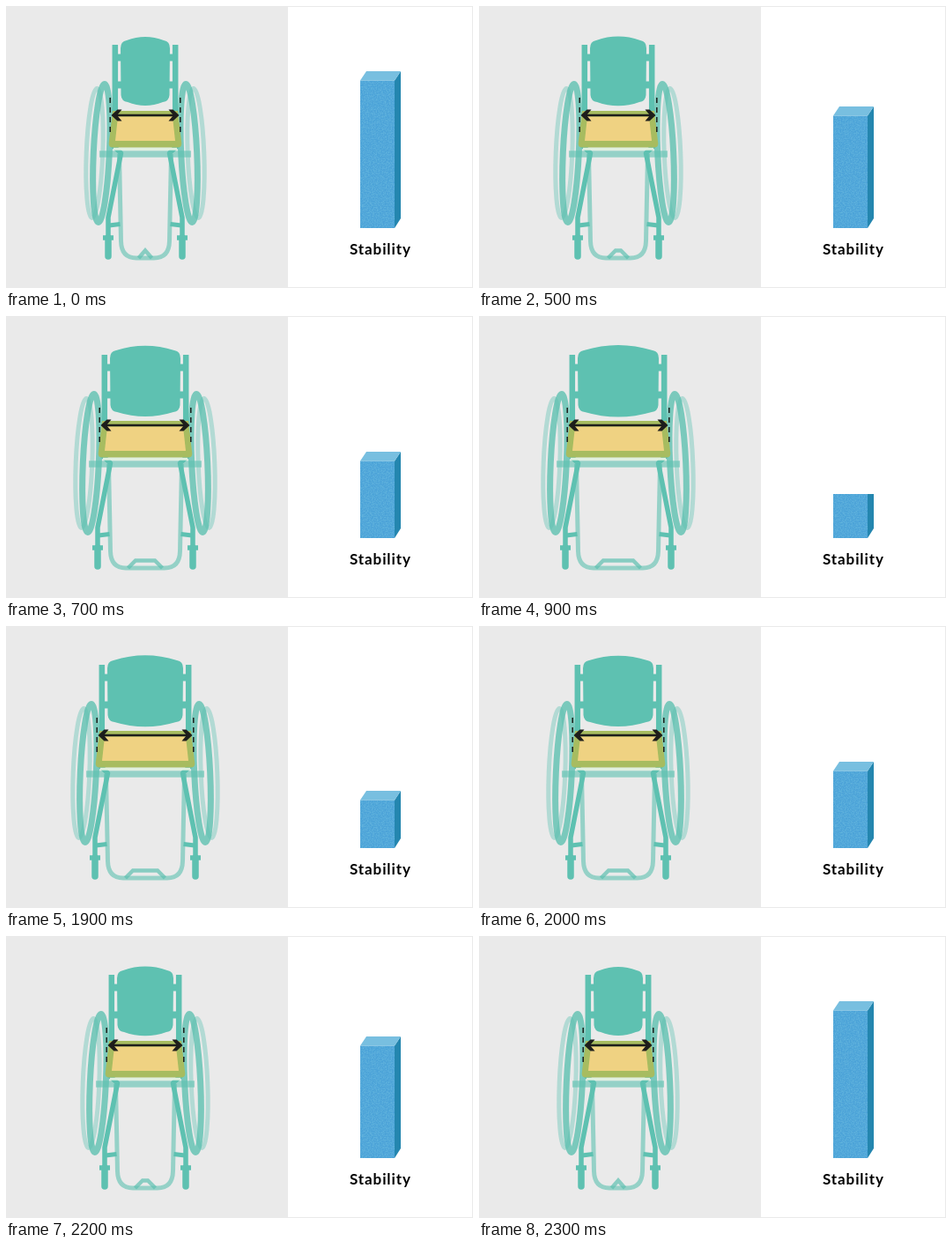
Animation of 530 by 320 pixels, one loop 2.8 s. Source, as an HTML page:

```html
<!DOCTYPE html>
<html lang="en">
<head>
<meta charset="utf-8">
<title>Seat width and stability</title>
<style>
  html, body { margin: 0; width: 100%; height: 100%; overflow: hidden; background: #eaeaea; }
  svg { display: block; }
  .line { fill: none; stroke: #5ec1b1; }
  .ink { fill: none; stroke: #1d1d1b; }
  text { font: bold 17px Lato, sans-serif; letter-spacing: .9px; }
</style>
</head>
<body>
<svg width="530" height="320" viewBox="0 0 530 320">
  <defs>
    <filter id="grain" x="0" y="0" width="1" height="1">
      <feTurbulence type="fractalNoise" baseFrequency=".7" numOctaves="2" seed="4"/>
      <feColorMatrix values="0 0 0 0 .16  0 0 0 0 .53  0 0 0 0 .76  1.2 0 0 0 -.4"/>
      <feComposite in2="SourceGraphic" operator="in" result="specks"/>
      <feMerge><feMergeNode in="SourceGraphic"/><feMergeNode in="specks"/></feMerge>
    </filter>
    <!-- Left half of the chair; the right half is its mirror image -->
    <g id="frame">
      <ellipse class="line" cx="100.5" cy="167" rx="9.3" ry="73.5" transform="rotate(2.2 100.5 167)" stroke-width="5" opacity=".4"/>
      <ellipse class="line" cx="108.3" cy="167" rx="9" ry="78.5" transform="rotate(2.6 108.3 167)" stroke-width="7" opacity=".8"/>
      <path class="line" d="M123.8 44V124" stroke-width="6.5"/>
      <path class="line" d="M126 58.5H132M126 89.5H132" stroke-width="8"/>
      <path class="line" d="M121 158L130.5 167L116 240V264" stroke-width="5.5" stroke-linejoin="round"/>
      <path class="line" d="M117 249L129.5 247.5" stroke-width="5"/>
      <path class="line" d="M110 263H122" stroke-width="5.5"/>
      <path class="line" d="M116 263V284" stroke-width="7.5" stroke-linecap="round"/>
    </g>
    <g id="marker">
      <path class="ink" d="M118.2 104V143" stroke-width="1.5" stroke-dasharray="6 5"/>
      <path d="M119.5 124L126.5 117.5H131.5L126 124L131.5 130.5H126.5Z" fill="#1d1d1b"/>
    </g>
  </defs>

  <rect width="530" height="320" fill="#eaeaea"/>
  <rect x="320" y="1" width="209" height="318" fill="#fff"/>

  <path id="axle" class="line" stroke-width="7.5" opacity=".6"/>
  <path id="loop" class="line" stroke-width="5" opacity=".6"/>
  <path id="plate" class="line" stroke-width="4.5" opacity=".7"/>
  <use href="#frame" class="left"/>
  <use href="#frame" class="right"/>
  <path id="back" fill="#5ec1b1"/>
  <path id="glow" fill="none" stroke="#dff0df" stroke-width="3"/>
  <path id="seat" fill="#a7bc60"/>
  <path id="cushion" fill="#efd282"/>
  <path id="arrow" class="ink" stroke-width="2.4"/>
  <use href="#marker" class="left"/>
  <use href="#marker" class="right"/>

  <path id="front" fill="#4ba2d8" filter="url(#grain)"/>
  <path id="side" fill="#2486af"/>
  <path id="top" fill="#78bfe0"/>
  <text x="390" y="282">Stability</text>
</svg>
<script>
const MID = 158, LOOP = 2800, STEP = 100;
// Each pose: extra half width of the chair, top of the bar, height of its top face
const poses = [[0, 74, 10.5], [4, 114, 10.5], [9, 134, 10.5], [12, 154, 10.5], [15, 187, 10.5], [18, 202, 0]];

const setPath = (id, d) => document.getElementById(id).setAttribute('d', d);
const setTransform = (name, value) =>
  document.querySelectorAll('.' + name).forEach(el => el.setAttribute('transform', value));

function drawChair(wide) {
  const l = x => x - wide, r = x => 2 * MID - x + wide;
  setTransform('left', `translate(${-wide})`);
  setTransform('right', `translate(${2 * MID + wide}) scale(-1 1)`);

  setPath('axle', `M${l(106)} 168H${r(106)}`);
  setPath('loop', `M${l(128.5)} 168L${l(130.5)} 267Q${l(131)} 286 ${l(148)} 286H${r(148)}Q${r(131)} 286 ${r(130.5)} 267L${r(128.5)} 168`);
  const tread = Math.max(0, wide - 1);
  setPath('plate', `M${l(150.5)} 286L${MID - tread} 277.5H${MID + tread}L${r(150.5)} 286`);

  const peak = 35 - wide / 9, dip = 113 + wide / 12;
  setPath('back', `M${l(130)} 48Q${l(130)} 40 ${l(137)} 39
    Q${MID} ${2 * peak - 39} ${r(137)} 39Q${r(130)} 40 ${r(130)} 48
    L${r(130.5)} 101Q${r(131)} 108 ${r(138)} 109
    Q${MID} ${2 * dip - 109} ${l(138)} 109Q${l(131)} 108 ${l(130.5)} 101Z`);

  setPath('glow', `M${l(122)} 162.2H${r(122)}`);
  setPath('seat', `M${l(121)} 119H${r(121)}L${r(116.7)} 156Q${r(116.7)} 160.5 ${r(121)} 160.5H${l(121)}Q${l(116.7)} 160.5 ${l(116.7)} 156Z`);
  setPath('cushion', `M${l(127)} 125.5H${r(127)}L${r(124)} 153H${l(124)}Z`);
  setPath('arrow', `M${l(122)} 124H${r(122)}`);
}

function drawBar(top, face) {
  const edge = top + face;
  setPath('front', `M402 ${edge}H441V252H402Z`);
  setPath('side', `M441 ${edge}L448 ${top}V241L441 252Z`);
  setPath('top', `M402 ${edge}L409 ${top}H448L441 ${edge}Z`);
}

function poseAt(time) {
  const steps = start => Math.min(5, Math.max(0, Math.floor((time - start) / STEP) + 1));
  return steps(500) - steps(1900);
}

let shown = -1;
function tick() {
  const pose = poseAt(performance.now() % LOOP);
  if (pose !== shown) {
    const [wide, top, face] = poses[shown = pose];
    drawChair(wide);
    drawBar(top, face);
  }
  requestAnimationFrame(tick);
}
tick();
</script>
</body>
</html>
```
